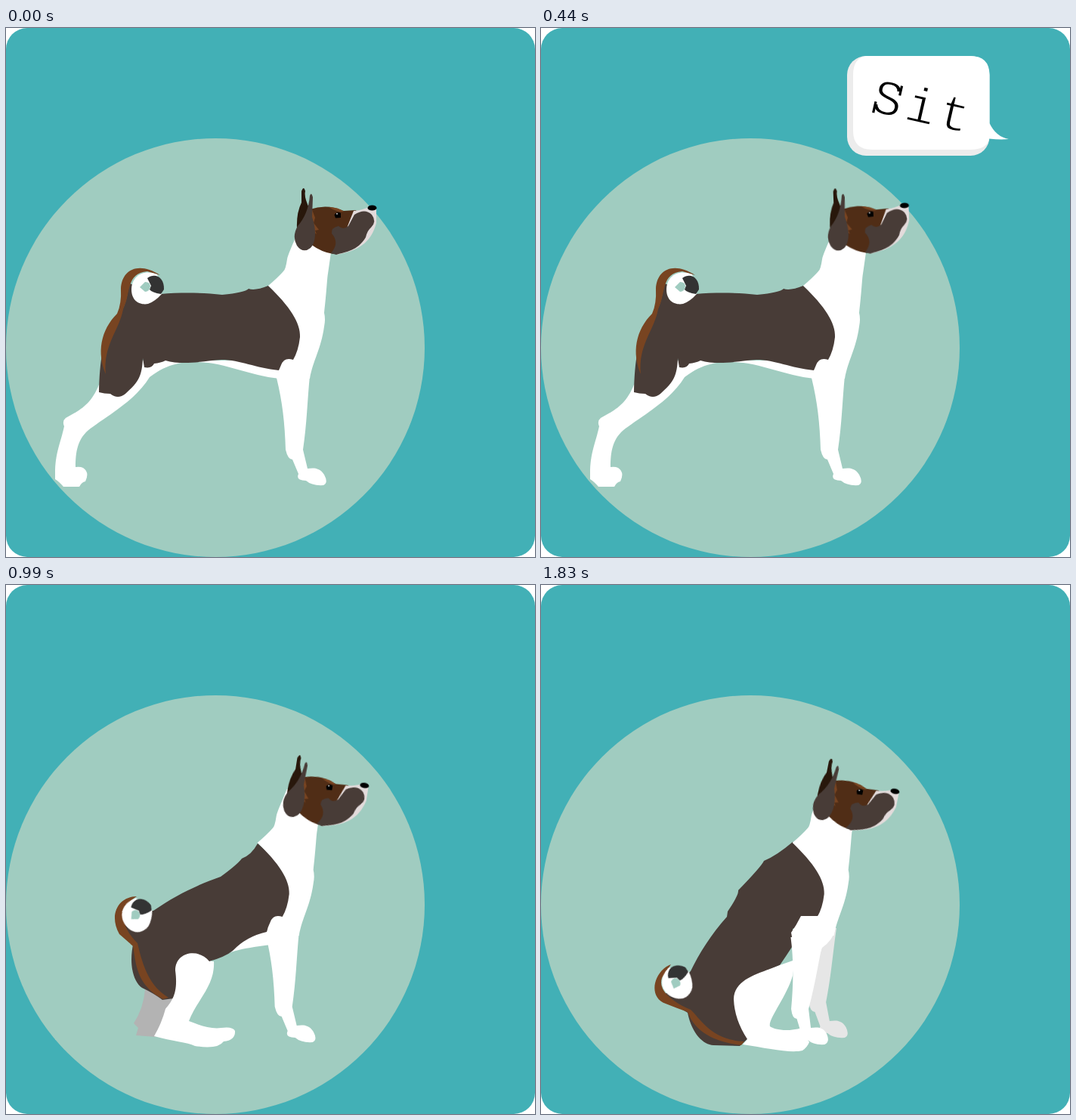
These frames come from a looping animation (700x700 px, 2310 ms). An HTML page:

```html
<!DOCTYPE html>
<html lang="en">
<head>
<meta charset="utf-8">
<title>Sit</title>
<style>
  html, body { margin: 0; width: 100%; height: 100%; overflow: hidden; background: #fff; }
  svg { display: block; width: 100vw; height: 100vh; }

  .pose, .bubble, .head, .tail { animation: 2310ms step-end infinite; }
  .pose, .bubble { visibility: hidden; }
  .stand  { animation-name: stand; }
  .bubble { animation-name: bubble; }
  .lower  { animation-name: lower; }
  .crouch { animation-name: crouch; }
  .sit    { animation-name: sit; }
  .head { animation-name: head; transform-origin: 439px 247px; }
  .tail { animation-name: tail; transform-origin: 188px 343px; }

  @keyframes stand  { 0% { visibility: visible } 38.095%, 100% { visibility: hidden } }
  @keyframes bubble { 0% { visibility: hidden } 19.047% { visibility: visible } 38.095%, 100% { visibility: hidden } }
  @keyframes lower  { 0% { visibility: hidden } 38.095% { visibility: visible } 42.857%, 100% { visibility: hidden } }
  @keyframes crouch { 0% { visibility: hidden } 42.857% { visibility: visible } 47.619%, 100% { visibility: hidden } }
  @keyframes sit    { 0% { visibility: hidden } 47.619%, 100% { visibility: visible } }

  @keyframes head {
    0% { transform: none }
    19.047% { transform: translate(-3.2px, -1.4px) rotate(-2.2deg) }
    38.095% { transform: translate(8px, 1px) rotate(14.2deg) }
    42.857% { transform: translate(-11px, 20px) rotate(9deg) }
    47.619%, 100% { transform: translate(-17px, 26px) rotate(11.2deg) }
  }
  @keyframes tail {
    0% { transform: none }
    38.095% { transform: translate(-2px, 27px) rotate(-8deg) }
    42.857% { transform: translate(-14px, 92px) rotate(-41deg) }
    47.619%, 100% { transform: translate(-8px, 181px) rotate(-67deg) }
  }

  .white { fill: #fff; }
  .coat { fill: #483c37; }
  .rust { fill: #784421; }
  .face { fill: #502d16; }
  .pale { fill: #e6e6e6; }
  .shade { fill: #b3b3b3; }
  .disc { fill: #a0ccc0; }
  text { font: 66px "Liberation Mono", "Courier New", monospace; letter-spacing: 5.5px; stroke: #fff; stroke-width: 1.8px; }
</style>
</head>
<body>
<svg viewBox="0 0 700 700">
  <defs>
    <path id="chest" d="M386 270C378 290 373 300 372 306Q370 320 367 322Q360 330 347 341C375 368 390 390 389 409Q387 427 380 439Q368 435 364 446L361 453 358 464H402C406 440 417 425 421 395Q423 385 421 377C424 352 425 330 426 325L430 297 408 280Z"/>
    <path id="leg" d="M358 463C366 495 369 525 370 558Q373 571 379 571L387 590Q383 599 397 599Q405 606 420 605Q427 602 421 591C415 581 406 582 399 583L393 558C398 525 399 490 402 460Z"/>
    <g id="front" class="white"><use href="#chest"/><use href="#leg"/></g>
  </defs>

  <rect width="700" height="700" rx="28" fill="#42b0b6"/>
  <circle class="disc" cx="277" cy="423" r="277"/>

  <g class="pose stand">
    <path class="white" d="M123 472C112 500 95 507 79 516Q74 520 77 527C72 550 66 560 65 585V597Q70 600 76 607H97Q100 601 105 600Q111 588 102 582Q98 580 92 581C92 560 95 545 108 533C130 515 170 495 190 462C215 443 235 442 250 442C290 442 320 460 362 464L366 440H180Z"/>
    <path class="coat" d="M347 341Q330 348 321 345Q316 350 286 353C260 350 230 350 205 352L163 338Q158 375 145 385C128 410 124 440 123 482Q130 484 138 484Q148 492 158 484C176 468 180 460 181 437L183 449Q193 451 196 444Q205 443 211 440C235 447 265 440 285 439C310 439 330 450 361 453L395 440V385Z"/>
    <path class="rust" d="M204 327C175 308 153 320 152 345Q153 365 147 378C125 400 120 430 132 458C128 420 150 400 155 372C166 350 158 325 187 322Z"/>
    <use href="#front"/>
  </g>

  <g class="pose lower">
    <use href="#leg" class="pale" transform="matrix(1 0 -.35 1 160 2)"/>
    <path class="white" d="M149 515C153 540 150 550 142 562Q140 568 129 583Q135 596 158 606Q168 615 178 615Q190 615 194 607Q204 603 200 596Q195 590 184 592Q172 588 165 580C185 550 205 525 207 488Q212 472 228 462C270 457 300 455 362 465L366 440H190Z"/>
    <path class="coat" d="M347 341Q330 352 320 351Q315 357 287 365C260 368 230 371 204 376L162 365Q162 400 150 420C135 440 138 480 142 515Q150 517 155 515Q163 522 170 514C188 498 193 480 193 462L195 473Q205 477 208 467Q215 465 220 461C260 468 280 445 315 449Q335 453 361 453L395 440V385Z"/>
    <path class="rust" d="M202 351C175 335 150 350 151 378Q156 400 149 412C132 440 135 460 146 490C138 440 160 420 158 385C165 365 165 350 186 347Z"/>
    <use href="#front"/>
  </g>

  <g class="pose crouch">
    <path class="shade" d="M184 535Q182 560 169 580L175 586 172 596 198 598 222 545Z"/>
    <path class="white" d="M269 499C295 483 320 480 350 476L355 440H290Z"/>
    <path class="coat" d="M333 342Q325 357 312 362Q306 370 284 386C255 396 225 410 195 431L155 430Q155 460 169 472C162 500 168 525 180 533Q195 540 207 549L222 547 240 500 269 498Q290 492 300 484Q318 465 345 459L381 440V385Z"/>
    <path class="rust" d="M173 412C150 412 135 435 150 462Q165 475 168 478C172 500 172 530 208 548L215 546C188 530 180 500 174 474C155 455 145 430 173 412Z"/>
    <path class="white" d="M269 498C255 480 224 485 224 510C228 540 220 550 211 561Q206 580 196 597C220 604 240 605 250 610Q280 615 288 604Q304 602 303 590Q300 584 285 586C270 588 255 582 242 577C252 550 277 530 275 498Z"/>
    <use href="#front" x="-14.300"/>
  </g>

  <g class="pose sit">
    <use href="#leg" class="pale" transform="matrix(1 0 -.05 1 12 -6)"/>
    <path class="coat" d="M333 340Q312 358 295 365Q292 372 261 404Q262 410 247 432L246 439C225 462 208 490 198 511L160 545 194 566C200 595 215 608 228 609L263 610 274 600 300 510 316 503Q325 490 334 476L333 455 381 440V385Z"/>
    <path class="rust" d="M172 502C150 510 140 545 165 554Q180 560 194 565C205 595 235 605 265 609L269 604C225 602 212 575 198 562C170 550 155 535 160 520Z"/>
    <g class="white">
      <use href="#chest" x="-14.300"/>
      <path d="M366 438L344 438Q338 450 331 460L334 476V500H365L372 480Q386 470 389 457L380 430Z"/>
      <path d="M316 503C290 514 256 520 255 548Q256 575 273 601L267 608C300 613 330 620 346 616Q352 612 355 605L345 586C325 592 308 588 303 584C300 575 325 545 333 517L336 496Z"/>
      <use href="#leg" transform="matrix(1 0 -.12 1 28 3)"/>
    </g>
  </g>

  <g class="tail">
    <path class="white" d="M200 326C180 318 166 330 166 346C166 362 178 367 188 365Q197 362 206 352Z"/>
    <path fill="#333" d="M187 331C198 323 210 331 209 346L205 352Q193 350 190 346L192 341Z"/>
    <path class="disc" d="M184 336Q191 336 191 342Q190 349 184 349L177 343Z"/>
  </g>

  <g class="head">
    <path fill="#28170b" d="M385 266Q384 245 391 231V216Q394 208 396 216Q394 224 402 240Z"/>
    <path class="face" d="M402 240Q425 232 447 242L463 241 472 252 433 299Q418 297 403 286Z"/>
    <path fill="#e3dbdb" d="M460 242Q473 241 484 235L490 240V258C483 285 465 295 437 300Z"/>
    <path class="coat" d="M461 247Q475 238 484 247Q491 256 483 264Q478 268 476 277C465 295 450 296 437 300L430 298Q442 284 431 272Q430 264 440 262Q446 268 453 262Z"/>
    <path class="rust" d="M427 237Q440 237 447 243Q438 244 427 237M404 238L409 251 407 258 414 267 409 268 411 273 402 265Z"/>
    <path class="coat" d="M402 222Q404 216 406 224L405 250C412 270 409 285 403 291Q393 299 385 288Q378 276 386 262Q400 246 402 222"/>
    <path d="M434.500 247Q438 242 443 245V251L436 251.500Z"/>
    <circle class="white" cx="438" cy="245.800" r=".9"/>
    <ellipse cx="484.500" cy="238" rx="6" ry="3.600"/>
  </g>

  <g class="bubble">
    <rect fill="#ececec" x="405" y="37" width="188.500" height="132" rx="25"/>
    <path class="white" d="M430 37H568Q593.500 37 593.500 62V126Q602 144 619 147Q608 148 593 146.500Q590 161 568 161H438Q413 161 413 136V62Q413 40 430 37Z"/>
    <g transform="translate(435 110) rotate(13)">
      <text>Sit</text>
      <path d="M34 -42V-29M5 -14V1" fill="none" stroke="#000" stroke-width="3.200"/>
    </g>
  </g>
</svg>
</body>
</html>
```
